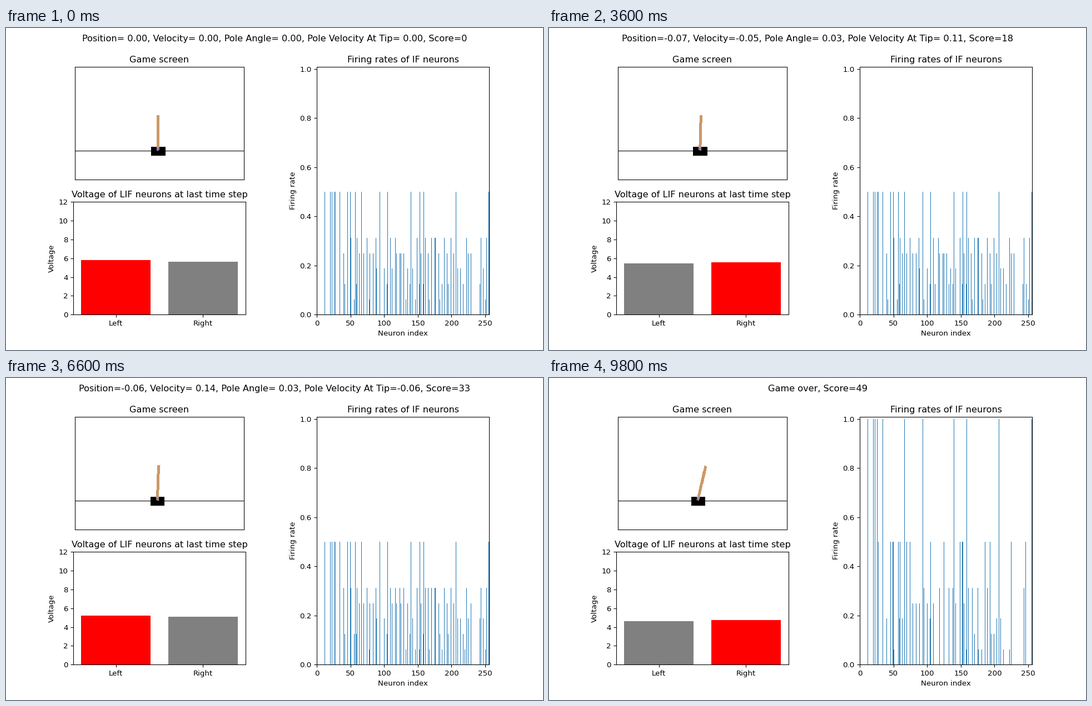
These frames come from a looping animation (966x580 px, 10000 ms). A matplotlib script:

```python
import math

import matplotlib.pyplot as plt
import numpy as np
from matplotlib.animation import FuncAnimation

WIDTH, HEIGHT, DPI = 966, 580, 96.6
FRAMES, INTERVAL = 50, 200
LAST = FRAMES - 1
T = 16    # simulation steps per decision
N = 256   # hidden neurons

# Position, velocity, pole angle and tip velocity before the first action
START = (-0.042, -0.048, -0.0023, -0.0012)

# The controller balances left and right, then pushes left until the pole falls
ACTIONS = ("LR" * 6 + "RL" * 10 + "R" + "LR" + "L" + "LR" * 4 + "L" * 5 + "R")

# Mean output voltage falls slowly; the chosen neuron lies above it
VOLT_STEP = [0, 18, 33, 44, 49]
VOLT_MEAN = [5.72, 5.5, 5.17, 5.05, 4.695]
VOLT_GAP = 0.07

# Neurons that saturate, and those that keep firing every other step
STRONG = [12, 20, 23, 26, 34, 66, 94, 140, 159, 207, 255]
STEADY = [28, 46, 50, 57, 105, 153]


def make_layer():
    """Input current of every neuron at rest and at full drive."""
    rng = np.random.default_rng(7)
    rest, full = np.full(N, -1.0), np.full(N, -1.0)
    weak = np.concatenate([np.linspace(38, 228, 60), np.linspace(242, 252, 7)])
    weak = weak.astype(int) + rng.integers(0, 3, weak.size)
    rest[weak] = 0.43 * rng.random(weak.size) ** 0.7
    full[weak] = np.minimum(rest[weak] + rng.normal(0, 0.35, weak.size), 0.9)
    rest[STEADY], full[STEADY] = 0.57, 0.65
    rest[STRONG], full[STRONG] = 0.62, 1.05
    return rest, full


def cart_pole_step(state, action):
    x, v, angle, spin = state
    force = 10 if action == "R" else -10
    sin, cos = math.sin(angle), math.cos(angle)
    push = (force + 0.05 * spin ** 2 * sin) / 1.1
    spin_acc = (9.8 * sin - cos * push) / (0.5 * (4 / 3 - 0.1 * cos ** 2 / 1.1))
    acc = push - 0.05 * spin_acc * cos / 1.1
    dt = 0.02
    return x + dt * v, v + dt * acc, angle + dt * spin, spin + dt * spin_acc


def simulate():
    states = [START]
    for action in ACTIONS[:LAST]:
        states.append(cart_pole_step(states[-1], action))
    return states


def firing_rates(state):
    drive = (state[3] - state[1]) / 3.15
    current = rest + (full - rest) * drive
    period = np.ceil(1 / np.maximum(current, 1e-3))
    return np.floor(T / period) / T


def render(state):
    img = np.ones((400, 600, 3))
    dx = cols - (300 + 125 * state[0])
    img[(abs(dx) <= 25) & (abs(rows - 100) <= 15)] = 0
    dy = rows - 107.5
    sin, cos = math.sin(state[2]), math.cos(state[2])
    along, across = dx * sin + dy * cos, dx * cos - dy * sin
    img[(along >= -5) & (along <= 120) & (abs(across) <= 5)] = (0.8, 0.6, 0.4)
    img[dx ** 2 + dy ** 2 <= 25] = (0.5, 0.5, 0.8)
    return img


def caption(i, state):
    if i == LAST:
        return f"Game over, Score={i}"
    x, v, angle, spin = state
    return (f"Position={x: .2f}, Velocity={v: .2f}, Pole Angle={angle: .2f}, "
            f"Pole Velocity At Tip={spin: .2f}, Score={i}")


cols, rows = np.meshgrid(np.arange(600) + 0.5, 399.5 - np.arange(400))
rest, full = make_layer()
states = simulate()

# The tiny margin keeps the pixel size from rounding down
fig = plt.figure(figsize=((WIDTH + 1e-3) / DPI, (HEIGHT + 1e-3) / DPI), dpi=DPI)
heading = fig.suptitle("")

screen_ax = plt.subplot2grid((2, 7), (0, 0), colspan=3)
screen_ax.set_title("Game screen")
screen_ax.set_xticks([])
screen_ax.set_yticks([])
screen = screen_ax.imshow(render(START), interpolation="nearest")
screen_ax.axhline(298, color="black", lw=0.8)

volt_ax = plt.subplot2grid((2, 7), (1, 0), colspan=3)
volt_ax.set_title("Voltage of LIF neurons at last time step")
volt_ax.set_ylabel("Voltage")
volt_bars = volt_ax.bar([0, 1], [1, 1], width=0.8)
volt_ax.set_xticks([0, 1], ["Left", "Right"])
volt_ax.set_ylim(0, 12)

rate_ax = plt.subplot2grid((2, 7), (0, 4), rowspan=2, colspan=3)
rate_ax.set_title("Firing rates of IF neurons")
rate_ax.set_xlabel("Neuron index")
rate_ax.set_ylabel("Firing rate")
rate_bars = rate_ax.bar(np.arange(N), np.zeros(N), width=0.83, color="#1f77b4")
rate_ax.set_xlim(0, N)
rate_ax.set_ylim(0, 1.01)


def draw(i):
    # The network sees an all-zero state before the first step
    seen = states[i] if i else (0, 0, 0, 0)
    heading.set_text(caption(i, seen))
    screen.set_data(render(states[i]))

    mean = np.interp(i, VOLT_STEP, VOLT_MEAN)
    for bar, side in zip(volt_bars, "LR"):
        chosen = side == ACTIONS[i]
        bar.set_height(mean + VOLT_GAP if chosen else mean - VOLT_GAP)
        bar.set_facecolor("red" if chosen else "gray")

    for bar, rate in zip(rate_bars, firing_rates(seen)):
        bar.set_height(rate)
        bar.set_visible(rate > 0)


anim = FuncAnimation(fig, draw, frames=FRAMES, interval=INTERVAL,
                     init_func=lambda: draw(0), repeat=True, repeat_delay=0)
plt.show()
```
